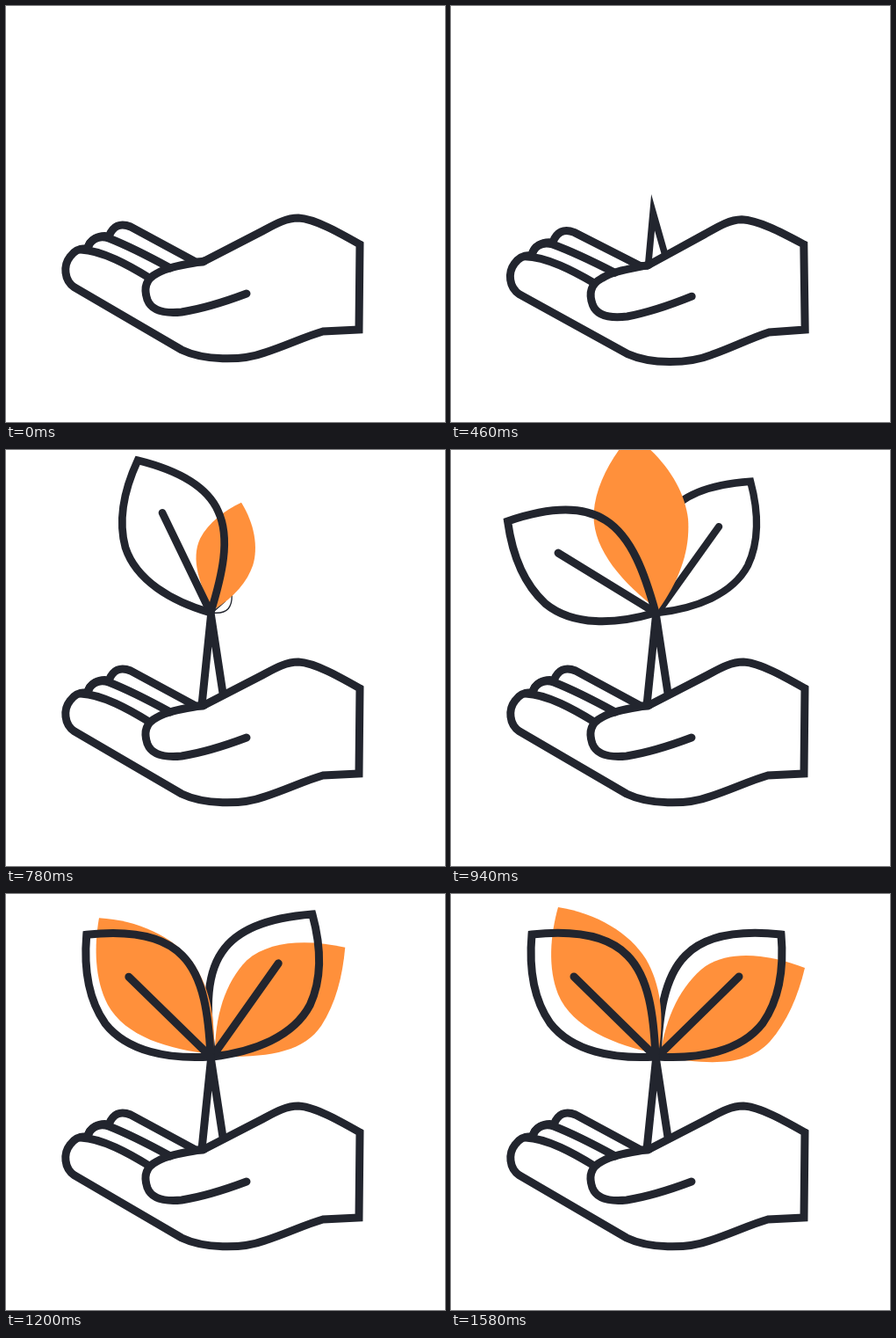
Animation, 500 px wide and 473 px high, one loop 1820 ms. Source, as an HTML page:

```html
<!DOCTYPE html>
<html lang="en">
<head>
<meta charset="utf-8">
<title>Growing plant</title>
<style>
html, body { margin: 0; width: 100%; height: 100%; overflow: hidden; background: #fff; }
svg { display: block; width: 100%; height: 100%; }
.line { fill: none; stroke: #22252e; stroke-width: 9; stroke-linecap: round; stroke-linejoin: miter; }
.leaf { fill: #ff903b; }
</style>
</head>
<body>
<svg viewBox="0 0 500 473">
  <defs>
    <g id="outline" class="line">
      <path d="M0 0C-2-45-7-90-32-115C-58-142-103-143-141-139C-144-105-141-68-120-38C-95-6-48 3 0 0Z"/>
      <path d="M0 0L-93-91"/>
    </g>
  </defs>
  <g id="stem" class="line">
    <path d="M222 300L233.5 188L250 296" stroke-miterlimit="12"/>
  </g>
  <g id="hand" class="line">
    <path fill="#fff" stroke-miterlimit="1.5" d="M403 271C380 258 352 242 333 241C318 241 305 249 290 257L224 291L216 291L142 251C130 246 122 250 117 262C105 260 95 266 93 276C85 275 78 278 73 285C65 295 66 312 78 320L200 391C225 403 268 404 295 394C320 386 340 376 361 370L402 368Z"/>
    <path d="M93 276C95 266 105 260 117 264C140 273 165 286 187 298"/>
    <path d="M85 277C110 278 140 295 163 309"/>
    <path d="M226 290C205 294 185 296 172 304C158 311 157 322 161 334C166 347 180 350 200 348C225 344 250 336 274 327"/>
  </g>
  <g id="orangeRight">
    <path class="leaf" d="M0 0C6-45 24-82 52-103C82-122 125-116 165-101C157-68 145-40 125-17C100 10 60 10 0 0Z"/>
  </g>
  <g id="lineRight"><use href="#outline" transform="scale(-1 1)"/></g>
  <g id="orangeLeft">
    <path class="leaf" d="M0 0C8-45 2-80-14-108C-33-138-70-160-114-167C-123-135-126-98-114-68C-98-30-50-10 0 0Z"/>
  </g>
  <g id="lineLeft"><use href="#outline"/></g>
</svg>
<script>
const LOOP = 1820, STEP = 20, HAND_START = 60;

// Each track is a list of [time, value] pairs.
const leaves = {
  lineLeft: {
    at: [233, 185],
    scale: [[590, 0], [690, .72], [780, .97], [880, 1]],
    turn: [[590, 80], [780, 19.8], [940, -12.9], [1140, -1.2], [1220, 0]]
  },
  lineRight: {
    at: [235, 185],
    scale: [[750, 0], [780, .15], [940, .925], [1020, 1]],
    turn: [[750, 6], [780, 3], [940, -10], [1060, -12], [1200, -10.3], [1480, 0]]
  },
  orangeLeft: {
    at: [236, 182],
    scale: [[690, 0], [780, .625], [940, 1]],
    turn: [[690, 70], [780, 49], [940, 25.6], [1200, -5.7], [1500, 0]]
  },
  orangeRight: {
    at: [238, 185],
    scale: [[950, 0], [1080, .8], [1180, 1]],
    turn: [[950, -45], [1080, -25], [1200, -8.5], [1480, 0]]
  }
};
const hand = {
  scale: [[60, 0], [130, .8], [200, 1.08], [280, 1]],
  turn: [[60, 50], [130, 22], [200, -2.3], [280, -2.1], [460, -1.4], [580, 0]]
};
const stemGrow = [[400, 0], [460, .585], [560, 1]];

const el = id => document.getElementById(id);

// Tangent at a key; flat at the ends and at turning points.
function slope(keys, i) {
  const a = keys[i - 1], b = keys[i], c = keys[i + 1];
  if (!a || !c) return 0;
  const l = (b[1] - a[1]) / (b[0] - a[0]), r = (c[1] - b[1]) / (c[0] - b[0]);
  return l * r <= 0 ? 0 : 2 * l * r / (l + r);
}

function sample(keys, t) {
  const last = keys.length - 1;
  if (t <= keys[0][0]) return keys[0][1];
  if (t >= keys[last][0]) return keys[last][1];
  const i = keys.findIndex(k => k[0] > t) - 1;
  const [t0, v0] = keys[i], [t1, v1] = keys[i + 1];
  const d = t1 - t0, u = (t - t0) / d, w = 1 - u;
  return v0 * (1 + 2 * u) * w * w + slope(keys, i) * d * u * w * w
       + v1 * u * u * (3 - 2 * u) - slope(keys, i + 1) * d * u * u * w;
}

function place(id, show, transform) {
  const node = el(id);
  node.style.display = show ? "" : "none";
  node.setAttribute("transform", transform);
}

function draw(t) {
  for (const [id, leaf] of Object.entries(leaves)) {
    const s = sample(leaf.scale, t);
    place(id, s > 0, `translate(${leaf.at}) rotate(${sample(leaf.turn, t)}) scale(${s})`);
  }
  const resting = t < HAND_START;
  const s = resting ? 1 : sample(hand.scale, t);
  const turn = resting ? 0 : sample(hand.turn, t);
  place("hand", s > 0, `translate(403 320) rotate(${turn}) scale(${s}) translate(-403 -320)`);

  const g = sample(stemGrow, t);
  place("stem", g > 0, `translate(236 300) rotate(${(g - 1) * 8}) scale(${.65 + .35 * g} ${g}) translate(-236 -300)`);
}

const start = performance.now();
function tick() {
  const t = (performance.now() - start) % LOOP;
  draw(Math.floor(t / STEP) * STEP);
  requestAnimationFrame(tick);
}
tick();
</script>
</body>
</html>
```
